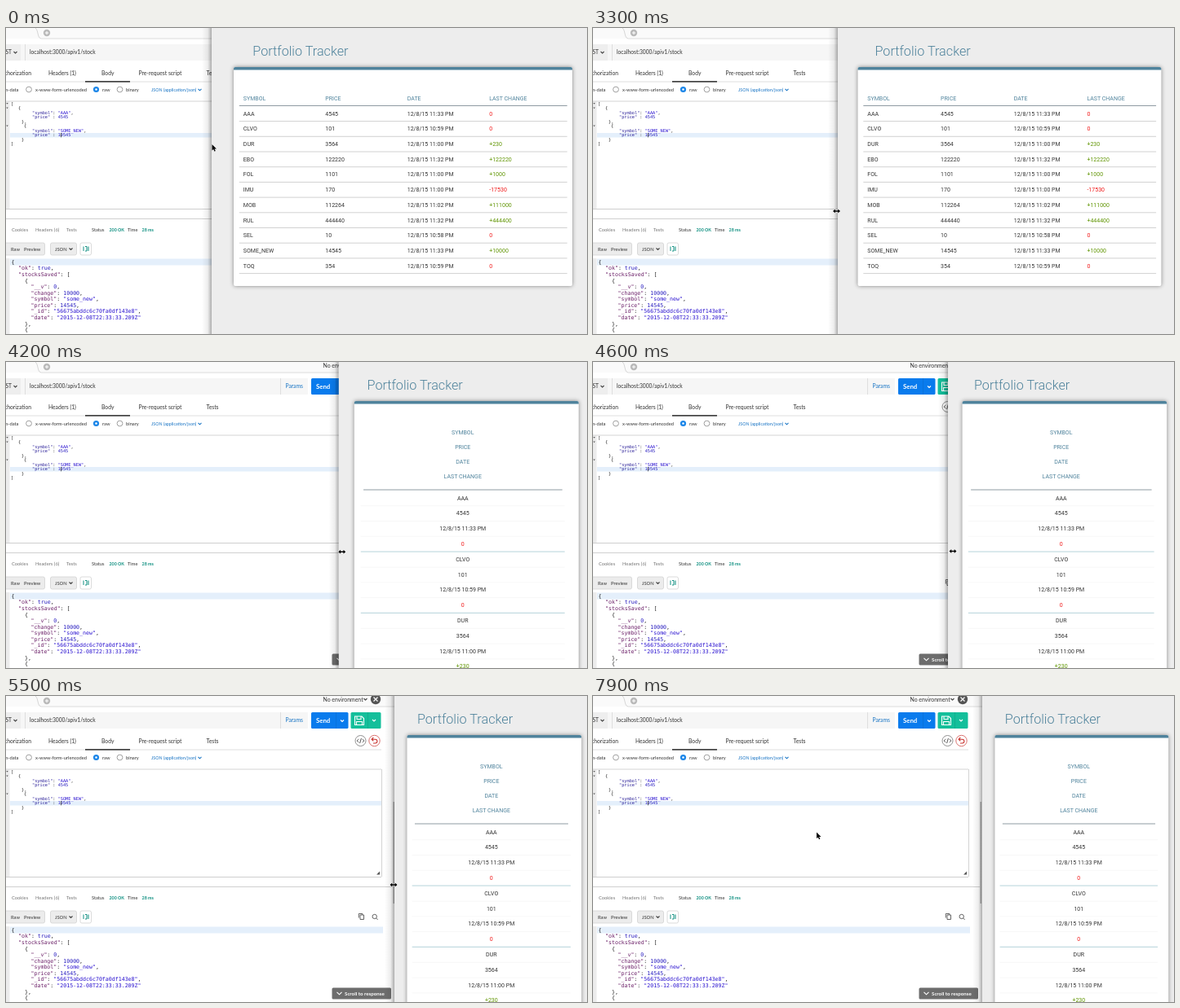
Recreate the animation shown at these times as an HTML page. Size 712 by 376 pixels, loop 8000 ms.

```html
<!DOCTYPE html>
<html lang="en">
<head>
<meta charset="utf-8">
<title>Stock service demo</title>
<style>
html, body { margin: 0; height: 100%; overflow: hidden; background: #fff; }
svg { display: block; width: 712px; height: 376px; }
text { white-space: pre; }
.ui { font-family: Lato, sans-serif; }
.code { font-family: "DejaVu Sans Mono", monospace; }
.app { font-family: Roboto, sans-serif; }
.card { filter: drop-shadow(0 0 2.5px rgba(0, 0, 0, .45)); }
</style>
</head>
<body>
<svg viewBox="0 0 712 376">
  <defs>
    <linearGradient id="shade">
      <stop offset="0" stop-color="#000" stop-opacity="0"/>
      <stop offset=".6" stop-color="#000" stop-opacity=".07"/>
      <stop offset="1" stop-color="#000" stop-opacity=".32"/>
    </linearGradient>
  </defs>
  <g id="client"></g>
  <g id="panel" class="app"></g>
  <g id="pointer"></g>
</svg>
<script>
const $ = id => document.getElementById(id);
const text = (x, y, s, size, fill, extra = '') =>
  `<text x="${x}" y="${y}" font-size="${size}" fill="${fill}" ${extra}>${s}</text>`;
const rect = (x, y, w, h, fill, extra = '') =>
  `<rect x="${x}" y="${y}" width="${w}" height="${h}" fill="${fill}" ${extra}/>`;
const path = (d, stroke, width = 1, fill = 'none') =>
  `<path d="${d}" stroke="${stroke}" stroke-width="${width}" fill="${fill}"/>`;
const circle = (x, y, r, fill, stroke = 'none') =>
  `<circle cx="${x}" cy="${y}" r="${r}" fill="${fill}" stroke="${stroke}" stroke-width=".8"/>`;
const hline = (x1, x2, y, color, width = 1) => path(`M${x1} ${y}H${x2}`, color, width);
const chevron = (x, y, color = '#444', r = 2) =>
  path(`M${x - r} ${y - r / 2}l${r} ${r}l${r} ${-r}`, color, 1.1);

const END = 'text-anchor="end"', MID = 'text-anchor="middle"', BOLD = 'font-weight="700"';
const INK = '#333', BLUE = '#1673c4', TEAL = '#0e8f80';

// Colours keys, strings and numbers of one JSON line
const paint = s => s.replace(/("[^"]*")(\s*:)?|\b(\d+|true)\b/g, (m, str, colon, num) =>
  num ? `<tspan fill="#2a1fc0">${num}</tspan>`
      : `<tspan fill="${colon ? '#6b1f68' : '#2a12d0'}">${str}</tspan>${colon || ''}`);

function drawClient() {
  let s = '<g class="ui">';
  // tab strip
  s += rect(0, 0, 480, 13, '#fafafa') + hline(43, 480, 13, '#dcdcdc') +
    path('M36 0C40 3 38 12 43 13', '#d0d0d0', .9) +
    circle(50, 6, 4.2, '#b9b9b9') + path('M47.8 6h4.4M50 3.8v4.4', '#fff', 1) +
    text(388.5, 6.6, 'No environment', 6.9, INK) + chevron(440.5, 4) +
    circle(453, 4, 6.2, '#555') + path('M450.5 1.5l5 5M455.5 1.5l-5 5', '#fff', 1.2);
  // address row
  s += rect(0, 20, 370, 20, '#f6f6f6') + rect(0, 20, 18, 20, '#eeeeee') +
    path('M23.5 20V40M336.5 20V40', '#d8d8d8', .8) +
    text(7, 32.4, 'POST', 6.6, INK, END) + chevron(11.5, 30) +
    text(29, 32.4, 'localhost:3000/apiv1/stock', 6.7, INK) +
    text(342.5, 32.4, 'Params', 6.7, BLUE) +
    rect(374, 20, 45.5, 20, '#097bed', 'rx="1.5"') +
    text(380, 33, 'Send', 7.8, '#fff', BOLD) + path('M404.5 20V40', '#0a6fd4', .7) + chevron(412, 30.5, '#fff') +
    rect(422.5, 20, 37, 20, '#14bf9b', 'rx="1.5"') +
    path('M427.5 25h8.5l2.5 2.5V35.5h-11zM430 25v3.5h5v-3.5M429.5 35.5v-4h7v4', '#fff', 1.1) +
    path('M443.5 20V40', '#10a889', .7) + chevron(451, 30, '#fff');
  // request tabs
  s += text(31, 57.5, 'Authorization', 6.75, INK, END) + text(52, 57.5, 'Headers (1)', 6.75, INK) +
    text(117, 57.5, 'Body', 6.75, INK) + text(162.5, 57.5, 'Pre-request script', 6.75, INK) +
    text(245.5, 57.5, 'Tests', 6.75, INK) +
    hline(0, 460, 66, '#dedede') + rect(97, 65, 55, 1.7, '#444') +
    circle(434.5, 55, 6.5, '#fff', '#777') + path('M432.3 53l-2.2 2l2.2 2M436.7 53l2.2 2l-2.2 2M435.4 52l-1.8 6', '#444', .9) +
    circle(451.5, 55, 6.7, '#fff', '#d0504c') +
    path('M448.5 53.2h4a2.4 2.4 0 0 1 0 4.8h-2.5M450.3 51l-2.2 2.2l2.2 2.2', '#c8302c', 1.1);
  // body type
  s += text(15.5, 77.6, 'form-data', 5.8, INK, END) + text(36, 77.6, 'x-www-form-urlencoded', 5.75, INK) +
    text(118, 77.6, 'raw', 5.8, INK) + text(147, 77.6, 'binary', 5.8, INK) +
    circle(28, 75.5, 3.4, '#fff', '#888') + circle(110.5, 75.5, 3.6, '#1c86e8') +
    circle(110.5, 75.5, 1.2, '#fff') + circle(139.5, 75.5, 3.4, '#fff', '#888') +
    text(178, 77.6, 'JSON (application/json)', 5.35, BLUE) + chevron(237.5, 75.8, BLUE);
  // editor frame
  s += rect(0, 90, 4.5, 132, '#ececec') + hline(0, 460, 90, '#d4d4d4') + hline(0, 460, 222.5, '#cfcfcf') +
    path('M460.5 90V222', '#d4d4d4') + rect(5, 129, 455, 5.5, '#e4effb') +
    path('M458 215.5v4h-4z', 'none', 0, '#555') + hline(0, 474, 234.5, '#cfcfcf');
  for (const y of [93, 98.5, 120.5, 287.5, 302.5, 310, 371])
    s += path(`M.3 ${y - 1}h2.4l-1.2 1.8z`, 'none', 0, '#555');
  // response header
  s += text(7, 250.4, 'Cookies', 5.75, '#777') + text(36, 250.4, 'Headers (6)', 5.85, '#777') +
    text(74, 250.4, 'Tests', 5.8, '#777') + text(105, 250.4, 'Status', 5.7, INK) +
    text(126.5, 250.4, '200 OK', 5.3, TEAL, BOLD) + text(149, 250.4, 'Time', 5.7, INK) +
    text(166.5, 250.4, '28 ms', 5.4, TEAL, BOLD);
  const button = (x, w, fill) => rect(x, 264, w, 15, fill, 'rx="2" stroke="#d2d2d2" stroke-width=".8"');
  s += button(-5, 52.5, '#ececec') + button(54.5, 32, '#ececec') + button(91, 13.5, '#fff') +
    text(6, 273.6, 'Raw', 5.8, INK) + text(22, 273.6, 'Preview', 5.8, INK) +
    text(60, 273.6, 'JSON', 5.8, INK) + chevron(79.5, 271.5) +
    path('M95 268.5v5.5M97 268.5h2v5.5h-2M101 268.5v5.5', TEAL, 1) +
    path('M432.3 272.5v-5h4.5v1.5M434 269h4.5v5.5h-4.5z', '#555', .9) +
    path('M449 271a2.7 2.7 0 1 0 5.4 0a2.7 2.7 0 1 0 -5.4 0M453.7 273l2 2', '#555', .9);
  // response frame
  s += rect(0, 283, 4.5, 93, '#ececec') + rect(5, 283.5, 457, 8, '#e4effb');
  s += '</g><g class="code">';
  const request = [
    [6, '['], [15, '{'], [32, '"symbol": "AAA",'], [32, '"price" : 4545'], [19, '},'],
    [22, '{'], [32, '"symbol": "SOME_NEW",'], [32, '"price" : 10545'], [19, '}'], [6, ']']];
  request.forEach(([x, l], i) => s += text(x, 95 + 5.48 * i, paint(l).replace(/#6b1f68/g, '#2a1f98'), 5.25, '#222'));
  s += rect(67.2, 129, .7, 5.3, '#222');
  const response = [
    [6.5, '{'], [15, '"ok": true,'], [15, '"stocksSaved": ['], [23, '{'], [30.5, '"__v": 0,'],
    [30.5, '"change": 10000,'], [30.5, '"symbol": "some_new",'], [30.5, '"price": 14545,'],
    [30.5, '"_id": "56675abddc6c70fa0df143e8",'], [30.5, '"date": "2015-12-08T22:33:33.209Z"'],
    [23, '},'], [23, '{']];
  response.forEach(([x, l], i) => s += text(x, 289.8 + 7.58 * i, paint(l), 6.6, '#222'));
  s += '</g><g class="ui">' + rect(399.5, 358.5, 72.5, 14, '#6d6d6d', 'rx="1.5"') + chevron(408.5, 365.3, '#fff', 3) +
    text(415, 367.7, 'Scroll to response', 6.2, '#fff', BOLD) + '</g>' +
    rect(474.5, 130, 1.5, 125, '#b4b4b4');
  $('client').innerHTML = s;
}

const HEAD = ['SYMBOL', 'PRICE', 'DATE', 'LAST CHANGE'];
const ROWS = `AAA 4545 11:33 0
CLVO 101 10:59 0
DUR 3564 11:00 +230
EBO 122220 11:32 +122220
FOL 1101 11:00 +1000
IMU 170 11:00 -17530
MOB 112264 11:02 +111000
RUL 444440 11:32 +444400
SEL 10 10:58 0
SOME_NEW 14545 11:33 +10000
TOQ 354 10:59 0`.split('\n').map(row => {
  const [name, price, time, change] = row.split(' ');
  return [name, price, `12/8/15 ${time} PM`, change];
});
const cellColor = (cell, col) => col < 3 ? '#333' : cell[0] == '+' ? '#5f9400' : '#f01818';
const STEEL = '#4f839c';

function drawPanel(edge, t) {
  const d = edge - 252, stacked = edge > 345, bar = stacked && t < 4200;
  const left = edge + 27 - d * .0515, right = 694 + d * .05 - (bar ? 7 : 0), width = right - left;
  let s = rect(edge - 12, 0, 12, 376, 'url(#shade)') + rect(edge, 0, 712 - edge, 376, '#ededed') +
    text(edge + 50.3 - d * .1, 33.8, 'Portfolio Tracker', 16.2, STEEL, 'font-weight="300"') +
    rect(left, 48, width, stacked ? 400 : 269, '#fff', 'rx="2" class="card"') +
    path(`M${left} 51.5v-1.5q0-2 2-2H${right - 2}q2 0 2 2v1.5z`, 'none', 0, STEEL);
  if (stacked) {
    const a = left + width * .029, b = right - width * .062, mid = (a + b) / 2;
    HEAD.forEach((h, i) => s += text(mid, 88.5 + 18.2 * i, h, 7, STEEL, MID));
    s += hline(a + 3.3, b - 3, 157, '#8f9ba2');
    ROWS.slice(0, 3).forEach((row, r) => {
      row.forEach((cell, i) => {
        const y = 169.5 + 75.3 * r + 18.75 * i;
        s += text(mid, y, cell, 7, cellColor(cell, i), MID) +
          hline(a, b, y + 7.3, i == 3 ? '#b5d3da' : '#f4f4f4', i == 3 ? 1 : .7);
      });
    });
  } else {
    const a = left + 6.8, b = right - 6.3, col = (b - a) / 4;
    const line = (cells, y, color) => cells.forEach((c, i) => s += text(a + 5 + col * i, y, c, 7, color(c, i)));
    line(HEAD, 88.5, () => STEEL);
    s += hline(a, b, 95.5, '#8f9ba2');
    ROWS.forEach((row, r) => {
      const y = 107.6 + 18.7 * r;
      line(row, y, cellColor);
      s += hline(a, b, y + 7, '#c6c6c6', .8);
    });
  }
  if (bar) s += rect(709, -4, 6, 142, '#777', 'rx="2.5"');
  $('panel').innerHTML = s;
}

// Linear interpolation through [time, value, ...] stops
function track(stops, t) {
  let i = 1;
  while (i < stops.length - 1 && stops[i][0] < t) i++;
  const p = stops[i - 1], q = stops[i];
  const k = Math.min(1, Math.max(0, (t - p[0]) / (q[0] - p[0])));
  return p.slice(1).map((v, j) => v + (q[j + 1] - v) * k);
}
const EDGE = [[3000, 252], [3100, 263], [3300, 300], [3500, 334], [3800, 375], [4100, 401],
  [4600, 435], [5000, 457], [5500, 476], [5900, 476], [6500, 477]];
const POINTER = [[1300, 252.5, 143], [1400, 252.5, 143], [1800, 252.5, 143], [1900, 257.5, 183],
  [2000, 260, 225], [2100, 260, 253], [2300, 258, 228], [2600, 253, 208], [2800, 253, 208],
  [3000, 252, 211], [3100, 262, 214], [3300, 298.5, 225], [3800, 382.5, 234], [4600, 441, 232.5],
  [5500, 475, 232], [6600, 475, 232]];

function drawPointer(t) {
  let [x, y] = track(POINTER, t);
  if (t > 6600) {
    const k = Math.min(1, (t - 6600) / 900), ease = k * k * (3 - 2 * k);
    x -= 201 * ease;
    y -= 64.5 * ease;
  }
  const resizing = t > 3000 && t < 6700;
  const shape = resizing
    ? 'M-4.5 0l2.8-2.6v1.8h3.4v-1.8l2.8 2.6l-2.8 2.6v-1.8h-3.4v1.8z'
    : 'M0 0v7.6l1.8-1.6l1.2 2.7l1.3-.6l-1.2-2.6h2.4z';
  $('pointer').innerHTML = `<path transform="translate(${x} ${y})" d="${shape}" fill="#000" stroke="#fff" stroke-width=".8" paint-order="stroke"/>`;
}

drawClient();
let shown = -1;
function frame(now) {
  const t = Math.floor(now % 8000 / 100) * 100;
  if (t != shown) {
    shown = t;
    drawPanel(track(EDGE, t)[0], t);
    drawPointer(t);
  }
  requestAnimationFrame(frame);
}
frame(0);
</script>
</body>
</html>
```
